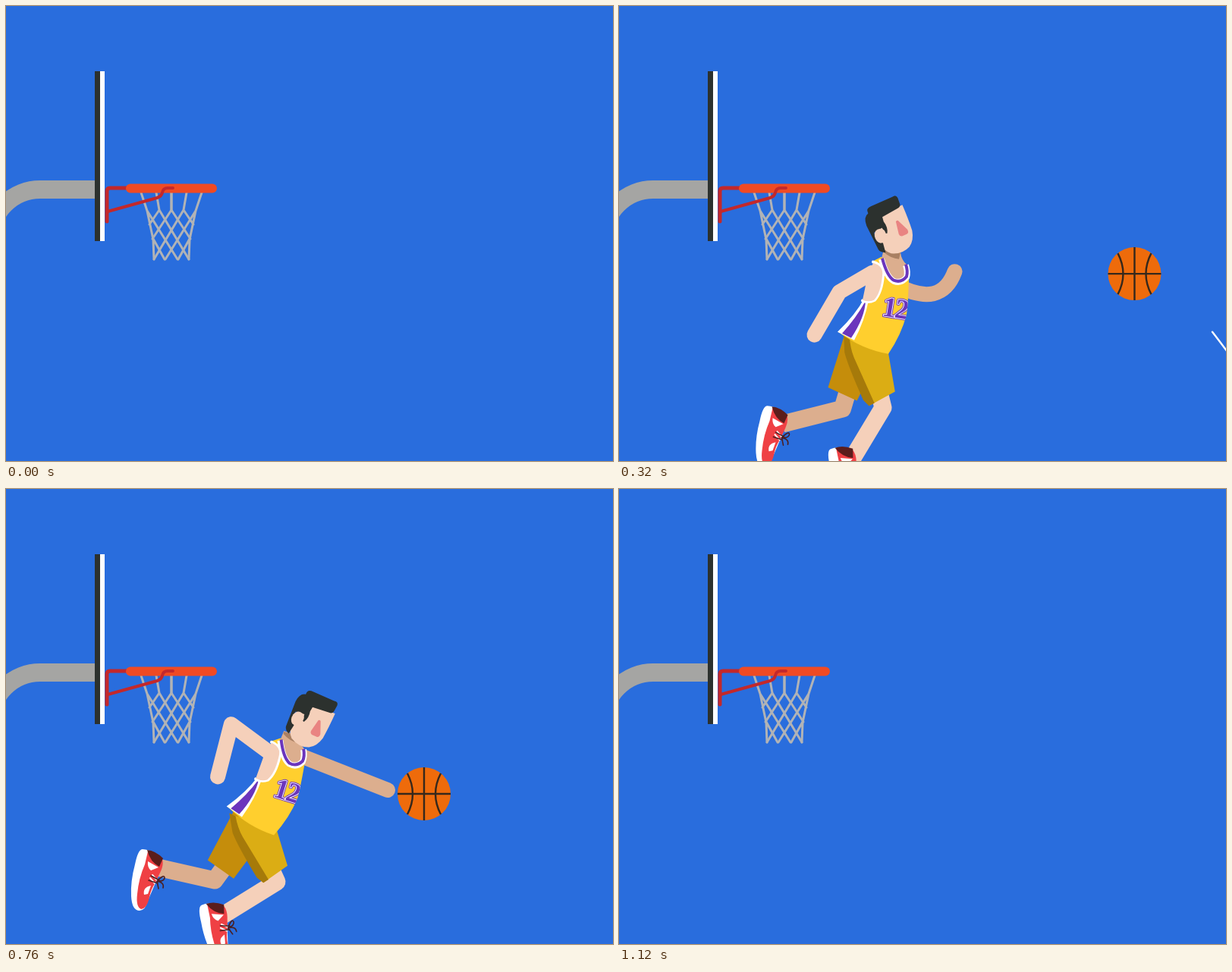
An HTML page with a canvas for the animation above (1.44 s loop, 800x600 px).

```html
<!DOCTYPE html>
<html lang="en">
<meta charset="utf-8">
<title>Basketball block</title>
<style>
html, body { margin: 0; height: 100%; overflow: hidden; background: #296ddd }
canvas { display: block }
</style>
<canvas id="stage" width="800" height="600"></canvas>
<script>
const c = document.getElementById('stage').getContext('2d');
const LOOP = 1440, STEP = 40;
const SKIN = '#f5d0ba', SHADE = '#dcae8e', DARK = '#2c312e', PURPLE = '#6b35bd', WHITE = '#fff';
c.lineJoin = 'round';

function fill(color, d) {
  c.fillStyle = color;
  c.fill(new Path2D(d));
}
function line(color, width, d, cap = 'round') {
  c.strokeStyle = color;
  c.lineWidth = width;
  c.lineCap = cap;
  c.stroke(new Path2D(d));
}
function group(x, y, degrees, draw) {
  c.save();
  c.translate(x, y);
  c.rotate(degrees * Math.PI / 180);
  draw();
  c.restore();
}
// Turns a drawing made in stage coordinates about a joint.
function turn(x, y, degrees, draw) {
  group(x, y, degrees, () => { c.translate(-x, -y); draw(); });
}
const mix = (a, b, u) => Array.isArray(a) ? a.map((v, i) => mix(v, b[i], u)) : a + (b - a) * u;

// head, torso, thighs and shoe are angles; the rest are joints
const run = {
  head: 5, torso: 0, elbow: [292, 376], hand: [264, 434],
  reach: [366, 385, 407, 419, 432, 397],
  farThigh: -1, farLeg: [296, 526, 219, 557],
  nearThigh: 8, nearLeg: [343, 525, 318, 602], shoe: -20
};
const jump = {
  head: -18, torso: 0, elbow: [289, 365], hand: [251, 420],
  reach: [366, 338, 442, 366, 453, 290],
  farThigh: 0, farLeg: [293, 523, 212, 532],
  nearThigh: 0, nearLeg: [353, 521, 296, 580], shoe: -30
};
const touch = { ...jump, head: 0, reach: [368, 340, 420, 313, 458, 262] };
const swat = {
  head: 33, torso: 8, elbow: [279, 315], hand: [271, 386],
  reach: [376, 347, 440, 372, 503, 397],
  farThigh: 10, farLeg: [275, 516, 200, 499],
  nearThigh: -3, nearLeg: [357, 518, 286, 562], shoe: -25
};
const land = {
  ...swat, farThigh: 15, farLeg: [267, 511, 201, 482],
  nearThigh: -16, nearLeg: [370, 512, 300, 560]
};
const keys = [[200, run], [440, jump], [600, touch], [760, swat], [920, land]];

function poseAt(t) {
  const next = keys.findIndex(k => k[0] > t);
  if (next === 0) return run;
  if (next < 0) return land;
  const [t0, a] = keys[next - 1], [t1, b] = keys[next];
  let u = (t - t0) / (t1 - t0);
  if (a === touch) u *= u;
  const pose = {};
  for (const name in a) pose[name] = mix(a[name], b[name], u);
  if (a === touch) pose.reach[4] += swing(u);
  return pose;
}
const swing = u => 14 * Math.sin(Math.PI * u);

function drawHoop() {
  line('#a5a5a3', 24, 'M117 242H45A66 66 0 0 0 -21 308', 'butt');
  fill(DARK, 'M117 86h7v224h-7z');
  fill(WHITE, 'M124 86h6v224h-6z');
  const strands = 'M178 246L186 270L194 308L195 334M198 246L202 269L241 334' +
    'M218 246V269L243 307M186 270L226 334M194 307L209 334M202 269L189 288';
  line('#b1b3b6', 3, strands);
  c.save();
  c.transform(-1, 0, 0, 1, 436, 0);
  line('#b1b3b6', 3, strands);
  c.restore();
  line('#c3282b', 5, 'M133 284V244Q133 240 137 240H160');
  line('#f04a23', 12, 'M164 240.5H272');
  line('#c3282b', 4, 'M134 271L199 253Q205 251 206 246Q207 240 213 240H220');
}

function drawShoe(x, y, angle) {
  group(x, y, angle, () => {
    fill(WHITE, 'M-20-24Q-26-24-30-4Q-36 18-35 38Q-34 57-24 57Q-16 56-14 46L4 4L-4-18Q-12-24-20-24Z');
    fill('#ef4044', 'M-13-21L6-11Q8-4 4 5L-3 20Q-9 29-11 39Q-14 54-22 55Q-29 52-27 35Q-25 14-17-4Z');
    fill('#5b1d1b', 'M-14-23Q-3-22 7-12L2-1Q-10-7-14-23Z');
    fill(WHITE, 'M-13-8L1 0L-9 4Q-14 0-13-8ZM-9 24Q-20 26-18 36L-13 35Z');
    line(WHITE, 2, 'M-10 14L-4 21M-7 10L-1 17');
    line('#4a1f22', 1.6, 'M-12 17L0 21M-9 11L2 17M-1 18Q9 8 9 14Q8 19-1 18Q9 20 7 27M-1 18L1 28');
  });
}

function drawLeg(color, hip, [kx, ky, ax, ay], shoe) {
  line(color, 23, `M${hip}L${kx} ${ky}L${ax} ${ay}`, 'butt');
  drawShoe(ax, ay, shoe);
}

const JERSEY = 'M334 330L346 324Q349 349 360 355Q372 361 379 350L378 334Q383 345 382 354' +
  'Q381 385 379 400Q372 427 355 452Q320 446 289 423Q315 400 325 380Q334 372 344 350Z';

function drawNumber() {
  c.save();
  c.clip(new Path2D(JERSEY));
  c.translate(364, 392);
  c.rotate(.16);
  c.font = 'bold 37px "Liberation Serif", serif';
  c.letterSpacing = '-2px';
  c.textAlign = 'center';
  for (const [color, width] of [[PURPLE, 3.6], [WHITE, 1.8]]) {
    c.strokeStyle = color;
    c.lineWidth = width;
    c.strokeText('12', 0, 12);
  }
  c.fillStyle = PURPLE;
  c.fillText('12', 0, 12);
  c.restore();
}

function drawHead() {
  fill(SKIN, 'M345 270L381 258Q387 278 390 293Q391 306 384 314Q374 323 359 320Q350 316 346 304Z');
  fill(DARK, 'M331 280Q328 268 335 264Q332 257 340 255L369 246Q374 243 376 248L378 257Q378 261 374 262' +
    'L353 271L354 277Q359 285 357 293L354 293L351 285L340 290Q340 302 350 305L352 318Q345 317 343 313Z');
  fill(SKIN, 'M340 295Q340 286 348 286Q356 287 355 296Q353 305 347 305Q341 303 340 295Z');
  fill('#e98482', 'M370 279Q372 276 374 279L384 291Q386 296 382 297L376 299Q373 299 372 296Z');
}

function drawTorso({ torso, head, elbow, hand }) {
  turn(322, 440, torso, () => {
    fill(SHADE, 'M349 314L371 318Q372 328 379 334L381 349Q373 358 364 356Q352 348 346 326Z');
    fill('#a98063', 'M349 315L371 318L369 327Q358 326 349 318Z');
    fill('#ffcf2e', JERSEY);
    fill(WHITE, 'M288 423Q312 400 323 379L329 381Q324 408 310 434Z');
    fill(PURPLE, 'M325 382Q324 404 306 431L294 425Q313 404 325 382Z');
    line(WHITE, 8, 'M346 327Q352 350 362 356Q372 360 379 351Q381 344 378 335', 'butt');
    line(PURPLE, 4, 'M347 326Q353 349 362 355Q372 359 379 350Q381 343 378 334', 'butt');
    drawNumber();
    line(WHITE, 4, 'M335 331Q349 335 348 349Q346 371 337 381Q329 385 321 382');
    fill(SKIN, 'M335 332Q349 336 347 349Q345 372 336 381Q329 384 321 381L327 352Z');
    line(SKIN, 20, `M334 345L${elbow}L${hand}`);
    turn(356, 323.5, head, drawHead);
  });
}

function drawPlayer(p) {
  const [sx, sy, qx, qy, hx, hy] = p.reach;
  line(SHADE, 20, `M${sx} ${sy}Q${qx} ${qy} ${hx} ${hy}`);
  drawLeg(SHADE, [312, 465], p.farLeg, 0);
  turn(308, 440, p.farThigh, () => fill('#c58d0b', 'M298 425L275 496L313 514L335 470L330 440Z'));
  drawLeg(SKIN, [335, 470], p.nearLeg, p.shoe);
  turn(325, 440, p.nearThigh, () => {
    fill('#dbad14', 'M297 428L355 446L368 499L335 520Q318 480 304 455Z');
    fill('#a67a0a', 'M295 426L303 430Q305 446 311 458L342 516L335 520L327 513Q304 470 298 452Z');
  });
  drawTorso(p);
}

function ballAt(t) {
  if (t < 600) {
    const s = 600 - t, d = s * (.5215 + .000452 * s);
    return [498 + d, 266 + d * (.025 + .002508 * d)];
  }
  if (t < 760) {
    const u = ((t - 600) / 160) ** 2;
    return [498 + 53 * u + swing(u), 266 + 136 * u];
  }
  return [551 + .544 * (t - 760), 402 + 1.4125 * (t - 760)];
}

function drawBall(t) {
  group(...ballAt(t), 0, () => {
    fill('#ee6b0b', 'M-35 0A35 35 0 1 1 35 0A35 35 0 1 1-35 0Z');
    line('#35281c', 2.4, 'M-35 0H35M0-35V35M-22-27Q-8 0-22 27M22-27Q8 0 22 27', 'butt');
  });
}

function drawTrail(head, tail, curve) {
  if (head >= tail) return;
  const points = Array.from({ length: 9 }, (_, i) => {
    const x = mix(head, tail, i / 8);
    return x + ' ' + curve(x);
  });
  line(WHITE, 2.4, 'M' + points.join('L'));
}

function drawTrails(t) {
  const s = t - 440;
  const arc = (a, b) => x => 266 + (x - 498) * (a * (x - 498) + b);
  if (t <= 600) {
    drawTrail(686 - .8 * s, 728 - 1.1 * s, arc(.00246, -.122));
    drawTrail(701 - .8625 * s, 756 - 1.2 * s, arc(.00264, -.0488));
  } else if (t > 780) {
    drawTrail(515 + (t - 800) / 6, Math.min(544, 515 + (t - 780) / 2), x => 445 + 1.33 * (x - 535));
  }
}

function draw(t) {
  c.fillStyle = '#296ddd';
  c.fillRect(0, 0, 800, 600);
  drawHoop();
  const rise = 360 * Math.max(0, 1 - t / 440) ** 3.07;
  const fall = t > 760 ? .0019 * ((t - 680) ** 2 - 6400) : 0;
  if (t > 0 && t < 1120) {
    group(0, rise + fall, 0, () => drawPlayer(poseAt(t)));
    drawTrails(t);
    drawBall(t);
  }
}

function tick() {
  draw(Math.floor(performance.now() % LOOP / STEP) * STEP);
  requestAnimationFrame(tick);
}
tick();
</script>
</html>
```
